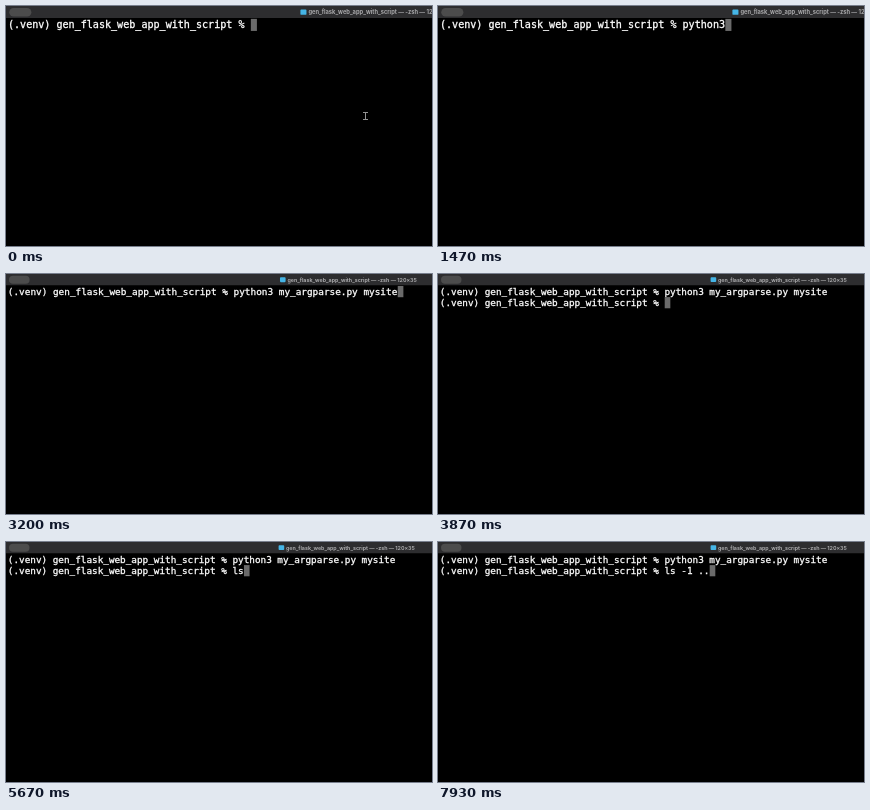
Animation of 426x240 px, one loop 8 s. Source, as an HTML page with a canvas:

```html
<!DOCTYPE html>
<html lang="en">
<head>
<meta charset="utf-8">
<title>Terminal session</title>
<style>
  html, body { margin: 0; width: 100%; height: 100%; overflow: hidden; background: #000; }
  canvas { display: block; width: 426px; height: 240px; }
</style>
</head>
<body>
<canvas id="stage" width="426" height="240"></canvas>
<script>
const ctx = document.getElementById('stage').getContext('2d');
const LOOP = 8000;
const FONT_SIZE = 9.34, CELL_WIDTH = FONT_SIZE * 0.602, LINE_HEIGHT = 11.2;
const LEFT = 1.8, TOP = 11.9, BASELINE = 8.7;
const PROMPT = '(.venv) gen_flask_web_app_with_script % ';
const TITLE = 'gen_flask_web_app_with_script — -zsh — 120×35';
const ENTER = 3590, POINTER_HIDES = 560;

// Each entry: [time in ms, text added at that time]
const firstLine = [
  [560, 'p'], [680, 'y'], [800, 't'], [930, 'h'], [1050, 'o'], [1170, 'n'],
  [1330, '3'], [1540, ' '], [1680, 'm'], [1810, 'y'], [2130, '_argparse.py '],
  [2460, 'm'], [2600, 'y'], [2740, 's'], [2870, 'i'], [3000, 't'], [3130, 'e'],
];
const secondLine = [
  [5280, 'l'], [5440, 's'], [5830, ' '], [6500, '-'],
  [6940, '1'], [7200, ' '], [7470, '.'], [7640, '.'],
];

const typed = (keys, t) => keys.filter(([at]) => at <= t).map(([, text]) => text).join('');

function zoomAt(t) {
  const p = Math.min(1, Math.max(0, (t - 2100) / 1300));
  return 1.08 - 0.08 * p * p * (3 - 2 * p);
}

function box(x, y, width, height, radius, color) {
  ctx.fillStyle = color;
  ctx.beginPath();
  ctx.roundRect(x, y, width, height, radius);
  ctx.fill();
}

function drawTitleBar() {
  box(0, 0, 460, 11.2, 0, '#2d2d2f');
  box(3, 1.8, 20.5, 8, 4, '#4c4c4c');
  box(272.6, 3.3, 5.6, 4.8, 0.8, '#45b5e6');
  ctx.font = '700 5.3px Inter, sans-serif';
  ctx.fillStyle = '#a8a8aa';
  ctx.fillText(TITLE, 280, 7.5);
}

function drawLine(row, text, hasCursor) {
  const y = TOP + row * LINE_HEIGHT;
  if (hasCursor) {
    box(LEFT + text.length * CELL_WIDTH, y, CELL_WIDTH, LINE_HEIGHT, 0, '#6a6a6a');
  }
  ctx.font = `${FONT_SIZE}px "DejaVu Sans Mono", monospace`;
  ctx.fillStyle = ctx.strokeStyle = '#fff';
  ctx.lineWidth = 0.3;
  ctx.fillText(text, LEFT, y + BASELINE);
  ctx.strokeText(text, LEFT, y + BASELINE);
}

function drawPointer() {
  ctx.strokeStyle = '#929292';
  ctx.lineWidth = 1;
  ctx.beginPath();
  ctx.moveTo(357, 106.5);
  ctx.lineTo(362, 106.5);
  ctx.moveTo(359.5, 106.5);
  ctx.lineTo(359.5, 113.5);
  ctx.moveTo(357, 113.5);
  ctx.lineTo(362, 113.5);
  ctx.stroke();
}

function draw(t) {
  ctx.setTransform(1, 0, 0, 1, 0, 0);
  box(0, 0, 426, 240, 0, '#000');
  if (t < POINTER_HIDES) drawPointer();

  const zoom = zoomAt(t);
  ctx.scale(zoom, zoom);
  drawTitleBar();
  drawLine(0, PROMPT + typed(firstLine, t), t < ENTER);
  if (t >= ENTER) drawLine(1, PROMPT + typed(secondLine, t), true);
}

const start = performance.now();
function tick() {
  draw((performance.now() - start) % LOOP);
  requestAnimationFrame(tick);
}
tick();
</script>
</body>
</html>
```
